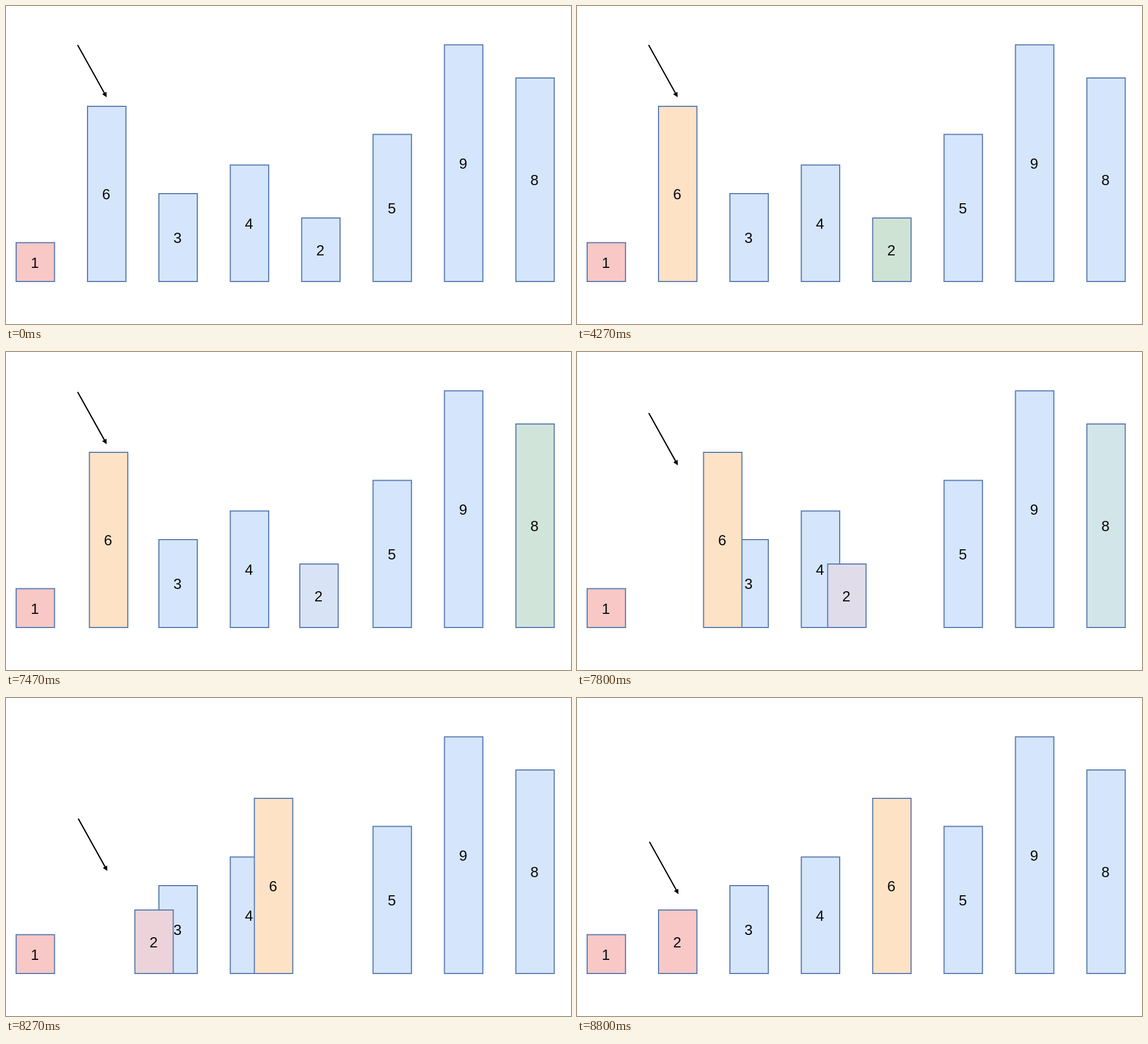
Write an HTML page that moves like this. It is 998 px wide and 561 px high and loops after 9.6 s.

```html
<!DOCTYPE html>
<html lang="en">
<head>
<meta charset="utf-8">
<title>Selection sort</title>
<style>
  html, body { margin: 0; width: 100%; height: 100%; overflow: hidden; background: #fff; }
  svg { display: block; width: 998px; height: 561px; }
  rect { stroke: #5c7db2; stroke-width: 2; }
  text { font: 26px "Liberation Sans", Arial, sans-serif; text-anchor: middle; fill: #0a0a0a; }
</style>
</head>
<body>
<svg id="stage" viewBox="0 0 998 561">
  <g id="bars"></g>
  <g id="arrow">
    <path d="M126.5 68.8L174.3 154.5" stroke="#000" stroke-width="2.2" fill="none"/>
    <path d="M177.8 161L169.8 155.6L177.4 151.4Z"/>
  </g>
</svg>
<script>
const LOOP = 9600, FPS = 15, BOTTOM = 486, PITCH = 126.1;
const BLUE = [213, 230, 252], GREEN = [207, 227, 211];
const ORANGE = [254, 226, 197], RED = [247, 200, 198];

// value, slot, top edge, in painting order
const BARS = [
  [1, 0, 417.5], [3, 2, 331], [4, 3, 280.5], [5, 5, 226.5],
  [9, 6, 68.5], [8, 7, 127], [2, 4, 374], [6, 1, 177]
];

// value, start, duration, from, to
const FADES = [[6, 800, 500, BLUE, ORANGE]];
[3, 4, 2, 5, 9, 8].forEach((value, i) => {
  const start = 1300 + i * 1000;
  FADES.push([value, start, 1000, BLUE, GREEN], [value, start + 1000, 1000, GREEN, BLUE]);
});
FADES.push([2, 7300, 1500, BLUE, RED]);

const SWAP = { start: 7322, length: 1433, distance: 3 * PITCH };

const progress = (t, start, length) => Math.min(1, Math.max(0, (t - start) / length));
const smooth = p => p * p * p * (p * (p * 6 - 15) + 10);
const mix = (a, b, p) => a.map((v, i) => v + (b[i] - v) * p);
const rgb = c => `rgb(${c.map(Math.round).join(",")})`;

function add(parent, tag, attrs) {
  const el = document.createElementNS("http://www.w3.org/2000/svg", tag);
  for (const name in attrs) el.setAttribute(name, attrs[name]);
  return parent.appendChild(el);
}

const bars = {};
for (const [value, slot, top] of BARS) {
  const group = add(document.getElementById("bars"), "g", {});
  const x = 17.9 + slot * PITCH;
  const rect = add(group, "rect", { x, y: top, width: 67.8, height: BOTTOM - top });
  add(group, "text", { x: x + 33, y: (top + BOTTOM) / 2 + 9.8 }).textContent = value;
  bars[value] = { group, rect };
}
const arrow = document.getElementById("arrow");

function colorAt(value, t) {
  let color = value === 1 ? RED : BLUE;
  for (const [v, start, length, from, to] of FADES) {
    if (v === value && t >= start) color = mix(from, to, progress(t, start, length));
  }
  return color;
}

function draw(t) {
  for (const [value] of BARS) bars[value].rect.setAttribute("fill", rgb(colorAt(value, t)));
  const p = smooth(progress(t, SWAP.start, SWAP.length));
  const shift = p * SWAP.distance;
  bars[6].group.setAttribute("transform", `translate(${shift} 0)`);
  bars[2].group.setAttribute("transform", `translate(${-shift} 0)`);
  arrow.setAttribute("transform", `translate(${p * 1.5} ${p * 185})`);
}

const origin = performance.now();
function tick(now) {
  const t = Math.max(0, now - origin) % LOOP;
  draw(Math.floor((t + 4) * FPS / 1000) * 1000 / FPS);
  requestAnimationFrame(tick);
}
draw(0);
requestAnimationFrame(tick);
</script>
</body>
</html>
```
